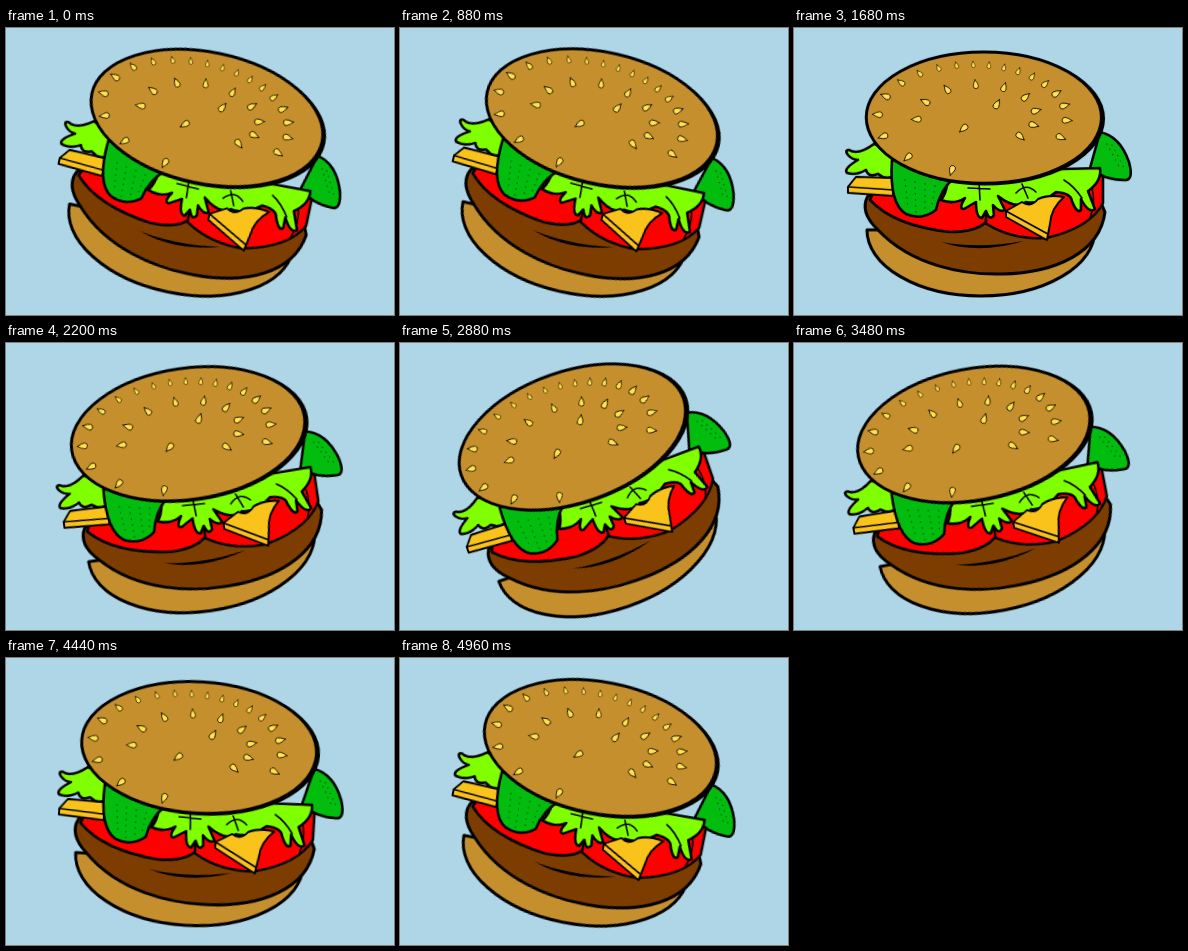
Animation of 388 by 287 pixels, one loop 5 s. Source, as an HTML page:

```html
<!DOCTYPE html>
<html lang="en">
<head>
<meta charset="utf-8">
<title>Rocking burger</title>
<style>
  html, body { margin: 0; width: 100%; height: 100%; overflow: hidden; background: #aed6e6; }
  svg { display: block; width: 100%; height: 100%; }
  #burger {
    transform-origin: 194px 143.5px;
    animation: rock 5s linear infinite;
    stroke: #000; stroke-width: 2.6; stroke-linejoin: round; stroke-linecap: round;
  }
  @keyframes rock {
    0%, 100% { transform: rotate(11.8deg); }
    9.4% { transform: rotate(19.4deg); }
    58% { transform: rotate(-19.4deg); }
  }
  .bun { fill: #c68f2e; stroke-width: 3; }
  .patty { fill: #7d3d00; stroke-width: 3; }
  .tomato { fill: #f00; }
  .cheese { fill: #fac31c; stroke-width: 2; }
  .pickle { fill: #02bc0e; }
  .lettuce { fill: #80ff00; }
  .line { fill: none; stroke-width: 1.6; }
  .dots { fill: none; stroke: #034d0a; stroke-width: 1.4; stroke-dasharray: 0 6; }
  .ink { stroke: none; }
  #seeds { fill: #ffe04e; stroke-width: .8; }
</style>
</head>
<body>
<svg viewBox="0 0 388 287">
  <defs>
    <path id="seed" d="M0-5.5Q6 4 0 4.5Q-6 4 0-5.5Z"/>
  </defs>
  <g id="burger">
    <path class="bun" d="M73 202A114 66 0 0 0 301 202Z"/>
    <path class="patty" d="M74 168Q65 184 84 202C118 238 170 247 208 246C262 245 306 224 311 184L306 172L190 160Z"/>
    <path class="ink" d="M147 214Q185 221 230 213Q185 227 147 214Z"/>

    <path class="tomato" d="M187 192Q214 212 252 210Q296 200 309 175V143L190 148Z"/>
    <path class="tomato" d="M76 172Q100 198 156 204Q182 204 192 194V150H86Z"/>
    <path class="line" d="M298 160Q302 175 296 190"/>

    <path class="cheese" d="M54 159L62 149L99 150V168L54 165Z"/>
    <path class="line" d="M54 159L99 162"/>

    <path class="pickle" d="M306 104Q326 108 335 134Q340 152 331 152Q310 152 296 140Z"/>
    <path class="dots" d="M313 116L327 142M318 117L332 143"/>

    <path class="lettuce" d="M80 116Q64 128 55 122C48 122 56 132 64 132Q49 141 53 145Q62 148 72 142Q74 150 84 146Q92 153 102 147V125Z"/>

    <path class="lettuce" d="M154 144Q154 164 147 172Q160 177 171 170Q164 181 170 181L182 174Q182 190 188 190L192 183Q196 194 200 187L199 177Q206 185 211 182L204 168Q222 182 232 174Q246 177 262 164Q277 165 278 173Q283 186 287 182L287 171Q295 186 301 181L294 163Q308 153 306 140Z"/>
    <path class="line" d="M174 160L196 161M185 153L186 172M222 165Q232 154 242 164M228 156L234 170M270 152Q280 158 288 170"/>

    <path class="cheese" d="M212 183L228 174Q237 180 244 171Q255 166 270 169Q257 180 256 196L253 212L212 189Z"/>
    <path class="line" d="M212 183L254 206"/>

    <path class="pickle" d="M98 132Q95 176 112 186Q128 193 142 182Q146 162 160 150Z"/>
    <path class="dots" d="M111 152L114 180M121 154L122 184M131 156V182M141 158L138 178"/>

    <ellipse class="ink" cx="191.5" cy="90.6" rx="119.5" ry="67"/>
    <ellipse class="bun" cx="189.8" cy="89.6" rx="117.6" ry="65.6"/>
    <g id="seeds"></g>
  </g>
</svg>
<script>
  const layer = document.getElementById("seeds");

  // Seeds point away from the middle of the bun and shrink towards its top.
  function addSeed(deg, radius) {
    const a = deg * Math.PI / 180;
    const x = 190 + 118 * radius * Math.cos(a);
    const y = 90 + 66 * radius * Math.sin(a);
    const size = Math.min(1, 0.55 + (y - 30) / 80);
    layer.insertAdjacentHTML("beforeend",
      `<use href="#seed" transform="translate(${x} ${y}) rotate(${deg + 90}) scale(${size})"/>`);
  }

  // The rim is crowded at the top and opens towards the bottom.
  for (let u = -10; u <= 8; u++) {
    const deg = 273 + 9.4 * u + 0.07 * u ** 3;
    addSeed(deg, 0.8 - 0.1 * Math.cos(deg * Math.PI / 180));
  }
  for (let i = 0; i < 9; i++) addSeed(178 + 28 * i, 0.57 - 0.02 * i);
  for (let i = 0; i < 2; i++) addSeed(138 + 160 * i, 0.23);
</script>
</body>
</html>
```
